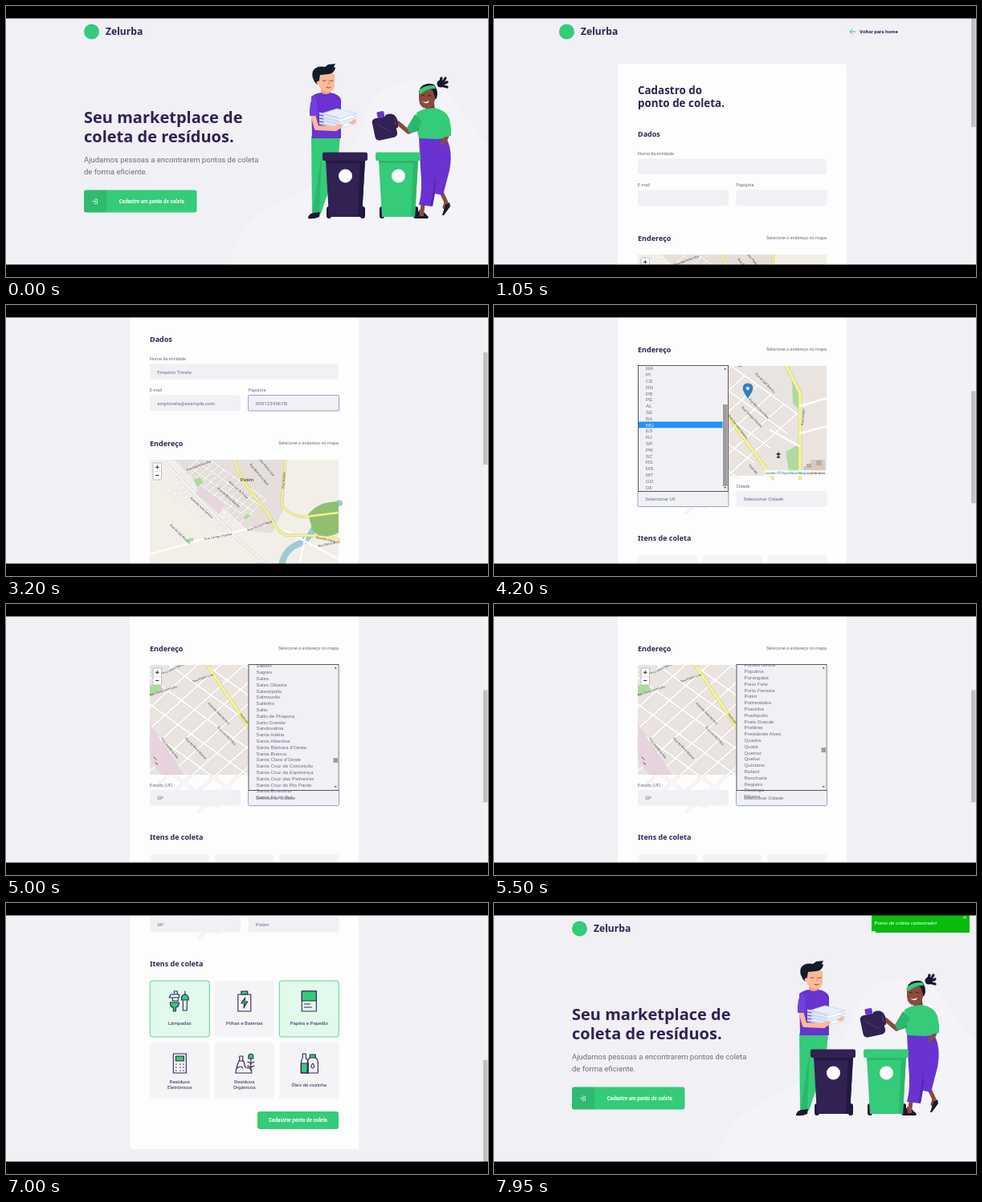
An HTML page for the animation above (8 s loop, 600 by 338 pixels).

```html
<!DOCTYPE html>
<html lang="pt-BR">
<head>
<meta charset="utf-8">
<title>Ponto de coleta</title>
<style>
html, body { margin: 0; width: 100%; height: 100%; overflow: hidden; background: #000; }
svg { display: block; width: 100vw; height: 100vh; }
svg svg { width: auto; height: auto; }
text { font-family: Roboto, sans-serif; font-size: 6.2px; fill: #6c6c80; white-space: pre; }
.h { font-family: "Noto Sans", sans-serif; font-weight: 700; fill: #322153; }
.label { font-size: 5.5px; }
.list { font-family: "Liberation Sans", sans-serif; }
.btn { font-weight: 700; font-size: 6.3px; fill: #fff; text-anchor: middle; }
.mid { text-anchor: middle; }
.item { fill: #322153; text-anchor: middle; }
.street { font-size: 3.9px; fill: #444; font-family: "Noto Sans", sans-serif; }
.ico { fill: none; stroke: #322153; stroke-width: 1.1; stroke-linejoin: round; stroke-linecap: round; }
.ico .g { fill: #34cb79; }
</style>
</head>
<body>
<svg id="stage" viewBox="0 0 600 338"></svg>
<script>
const GREEN = '#34cb79', INK = '#322153', SKIN = '#fbb997', BROWN = '#8a4b3c', VIOLET = '#6833d0';
const BRAND = 'Zelurba';
const NAME = 'Empório Trivela', MAIL = 'emptrivela@example.com', PHONE = '00912345678';

const text = (x, y, s, cls = '', more = '') => `<text x="${x}" y="${y}" class="${cls}" ${more}>${s}</text>`;
const title = (x, y, s, size) => text(x, y, s, 'h', `style="font-size:${size}px"`);
const rect = (x, y, w, h, fill, rx = 0, more = '') =>
  `<rect x="${x}" y="${y}" width="${w}" height="${h}" fill="${fill}" rx="${rx}" ${more}/>`;
const circle = (x, y, r, fill) => `<circle cx="${x}" cy="${y}" r="${r}" fill="${fill}"/>`;
const path = (d, fill, more = '') => `<path d="${d}" fill="${fill}" ${more}/>`;
const line = (d, color, w) => path(d, 'none', `stroke="${color}" stroke-width="${w}" stroke-linecap="round" stroke-linejoin="round"`);
const logo = (x, y) => circle(x + 9.5, y, 9.5, GREEN) + title(x + 27, y + 4.3, BRAND, 12.1);

// ---------- home ----------
function bin(x, color, dark) {
  return rect(x + 5, 250, 6, 15, '#1d1733', 3) + rect(x + 47, 250, 6, 15, '#1d1733', 3) +
    path(`M${x + 4} 192h49l-4 71h-41z`, color) + path(`M${x + 47} 192h6l-4 71h-5z`, dark) +
    path(`M${x + 4} 192h49l-.3 4h-48.4z`, dark) + rect(x, 182.5, 56, 10.5, color, 2) +
    circle(x + 28.5, 212, 8.5, '#fff');
}

function man() {
  const sheets = [0, 1, 2, 3].map(i =>
    path(`M390 ${147 - i * 4}l25 6 22-7-25-6z`, i % 2 ? '#e9effa' : '#f8faff', 'stroke="#b9cbe8" stroke-width=".6"') +
    path(`M390 ${147 - i * 4}l25 6v-2.500l-25-6z`, '#c9d9f2')).join('');
  return path('M380 162h36l-2 24-4 20-18 53h-11z', GREEN) + path('M393 184l-3 73h-8z', '#2bb86b') +
    path('M376 265q0-5 6-7l9-1-1 6q-6 3-14 2z', '#1d1733') +
    path('M392 98h12v12q-6 4-12 0z', '#f2a583') +
    path('M388 85q10-4 21 0v14q-1 9-9 8-9-1-11-9z', SKIN) +
    path('M387 98q-8-9-5-17 5-7 15-5l4-3 9-1-2 4 2 1q-1 7-9 8l-10 1-2 11z', '#101b2c') +
    circle(389, 96, 2.4, SKIN) +
    line('M394 93q2 1.500 4 0M403 93q2 1.500 4 0M399 101.500q3 1.500 5 0', '#5b3030', .8) + line('M401 93l2 4h-2', '#df8d6b', .8) +
    path('M380 113q5-4 12-5 6 4 12 0 11 2 13 9v48h-36z', VIOLET) +
    sheets +
    line('M381.500 133l5 19 24 1', SKIN, 6) + path('M378 137q-1-17 5-25 6 4 4 25z', '#7440dc') +
    path('M407 150l9-3 4 2-6 5h-7zM426 146l8-5 2 3-4 4z', SKIN);
}

function woman() {
  return line('M520 240l-2 16M541 230l7 15-2 6', BROWN, 5) +
    path('M509 265l4-9 7 1 6 6-1 2zM543 261l4-13 5-3 1 5-8 11z', '#1d1733') +
    path('M514 254h6v8h-5z', BROWN) +
    path('M514 163h33q10 16 5 42l-8 31-10-2-3 16-17-2q5-18 2-45z', VIOLET) +
    path('M532 196q4 20-4 52l3 1 4-25z', '#5626b4') +
    circle(541, 97, 4.5, '#15172b') + line('M540 98l2-8M542 98l5-8M542 98l7-3M541 99l8 2', '#15172b', 3.2) +
    path('M515 103q7-9 18-5 6 8 3 17l-5 4-9-9z', '#15172b') +
    path('M521 116h11l2 13-11 4z', '#74392e') +
    path('M514 105q8-6 17 0l3 9q0 12-9 14-10 0-11-11z', BROWN) +
    path('M513 107q6-9 20-8l2 4q-10-1-19 7z', GREEN) +
    line('M517 112q2-2 4 0M525 112q2-2 4 0', '#27110f', .8) + path('M518 119q5 2 9-1-2 6-9 1z', '#fff') +
    path('M511 133q9-6 22-6 15 3 19 14l2 17q-5 8-18 8l-22-1-4-17z', GREEN) +
    line('M511 153l-10 4-13-11', BROWN, 5.5) + path('M509 135l9 9-7 13-9 1-3-6z', '#2bb86b') +
    line('M548 148q5 14-5 23', BROWN, 5) + path('M541 130q14 5 13 32l-11 2z', GREEN) +
    line('M488 146l-5-4', BROWN, 3.5) +
    `<g transform="rotate(-12 471 150)">${rect(457, 138, 28, 28, INK, 5)}${rect(465, 131, 9, 7, VIOLET, 1.5)}` +
    `${line('M476 138q11-2 11 9l-1 7', INK, 3)}${line('M463 146l14 12', '#4b3a75', 1)}</g>`;
}

const home = rect(0, 0, 600, 338, '#f0f0f5') +
  path('M279 323q3-45 45-69 46-22 78-48 38-31 45-66 14-45 60-47 36 0 57 32 14 24 36 46v152z', '#f4f4f8') +
  logo(97, 32) +
  ['Seu marketplace de', 'coleta de resíduos.'].map((s, i) => title(97, 146 + i * 24, s, 20)).join('') +
  ['Ajudamos pessoas a encontrarem pontos de coleta', 'de forma eficiente.'].map((s, i) =>
    text(97, 195 + i * 14.5, s, '', 'style="font-size:9.5px"')).join('') +
  rect(97, 229.5, 140.5, 28, GREEN, 3) + path('M100 229.500h25v28h-25q-3 0-3-3v-22q0-3 3-3z', '#000', 'opacity=".08"') +
  line('M110.500 241h3v5.500h-3M107.500 243.700h4M110 242l1.700 1.700-1.700 1.700', '#fff', .7) +
  text(181.3, 245.8, 'Cadastre um ponto de coleta', 'btn') +
  man() + woman() + bin(394, INK, '#241741') + bin(460, GREEN, '#2bb86b');

// ---------- map ----------
function grid(x, y, w, h, step, angle, width) {
  let d = '';
  for (let i = 0; i <= w; i += step) d += `M${i} 0v${h}`;
  for (let j = 0; j <= h; j += step * 1.35) d += `M0 ${j}h${w}`;
  const at = `transform="translate(${x} ${y}) rotate(${angle}) skewX(-12)"`;
  return `<g ${at}>${line(d, '#d3ccc6', width + .8)}${line(d, '#fff', width)}</g>`;
}
const street = (x, y, a, s) => text(0, 0, s, 'street', `transform="translate(${x} ${y}) rotate(${a})"`);
const road = (d, w) => line(d, '#cfc765', w + 1) + line(d, '#f5f3a0', w);
const green = d => path(d, '#aedb9d');

const farMap = rect(0, 0, 235, 137, '#f2efe9') +
  path('M30 0h140l-4 62-14 30-30-4-70-66z', '#e5dfdb') +
  `<g>${grid(66, -6, 96, 64, 8, 35, 1.1)}</g>` +
  line('M16 0l92 98 60 52', '#c9c2bd', 3) + line('M16 0l92 98 60 52', '#fff', 2) +
  path('M60 30l34 26-8 12-28-26z', '#e6d5dd') +
  green('M54 25l8-3 5 6-8 6zM46 99l8-2v5l-8 1zM116 72l6-5 3 3-6 5z') +
  line('M163 139q2-24 18-32 17-6 25-25 10-22 30-28', '#9ccbd6', 8) +
  path('M197 68q16-18 38-15v38q-20 10-32-2z', '#8fc06f') +
  line('M0 118l70-20 75-17M168 88l67 36M195 90l-10 47', '#fff', 2) +
  road('M105 0q8 24 20 38l21 28q14 26 24 28h25l40 5', 2.6) + road('M169 0l-5 56q12 16 30 15l41-5', 2.2) +
  [[46, 14, -20, 'Rua Jequitibá Alto'], [50, 48, 43, 'Avenida Vale Sereno'], [84, 36, 42, 'Rua da Brisa Mansa'],
   [98, 28, 42, 'Rua Lua de Prata'], [124, 6, 50, 'Rua Bem-te-vi Real'], [136, 0, 50, 'Rua Pedra Lisa'],
   [167, 36, -85, 'Rua Violeta'], [68, 100, -10, 'Rua Campo Florido'], [122, 89, -20, 'Rua Manacá Roxo'],
   [207, 98, 13, 'Rua Rio Claro'], [210, 109, -12, 'Rua Beira Mata'], [25, 82, 44, 'Rua do Ipê Branco']]
    .map(a => street(...a)).join('') +
  text(121, 27, 'Potim', 'mid', 'style="fill:#222"');

const nearMap = rect(0, 0, 235, 137, '#e9e4e0') +
  grid(20, -70, 230, 180, 20, 36, 2.2) +
  path('M0 74l43 63H14L0 118z', '#e6d3dd') +
  green('M0 25l12-3 4 9-16 8zM192 19l10 12v24l-9-8zM184 107l18-10v34h-14z') +
  path('M206 137v-12h9v-8h18v18z', '#d9c9bd') + path('M210 122h6v5h-6zM222 118h7v6h-7z', '#b9aca3') +
  road('M70-2l24 36 28 42 46 64', 3.2) + road('M184-2l18 36v106', 3.4) +
  line('M165 80l36 20M202 50l34-10M202 84l34-9', '#fff', 2.4) +
  [[16, 12, -24, 'Rua Vento Norte'], [0, 39, -18, 'Rua Santa Alvorada'], [54, 22, -20, 'Rua Pedra Lisa'],
   [72, 48, 46, 'Avenida Vale Sereno'], [84, 78, 46, 'Rua Lua de Prata'], [44, 92, 46, 'Rua da Brisa Mansa'],
   [14, 92, 52, 'Rua Jequitibá Alto'], [126, 2, -20, 'Rua Manacá Roxo'], [138, 42, 46, 'Rua Bem-te-vi Real'],
   [129, 52, 46, 'Rua Campo Florido'], [112, 62, 52, 'Avenida Vale Sereno'], [146, 10, 46, 'Rua do Ipê Branco'],
   [206, 74, -85, 'Rua Violeta'], [138, 124, 50, 'Avenida']].map(a => street(...a)).join('') +
  line('M175 108v6M173 110h4M173.500 114h3', '#222', 1.3) +
  line('M5 115l3 3M7 122l3 2', '#555', 1) +
  `<g id="pin">${path('M137 40q-6-9-6-12 0-6 6-6t6 6q0 3-6 12z', '#2a81cb', 'stroke="#1f669f" stroke-width=".7"')}${circle(137, 28, 2.1, '#fff')}</g>`;

const map = `<svg x="179" y="271" style="width:235px;height:137px"><g id="far">${farMap}</g><g id="near">${nearMap}</g>
  ${rect(4, 4, 10.5, 21, '#fff', 1.5, 'stroke="#aaa" stroke-width=".8"')}${line('M4 14.500h10.500', '#ccc', .5)}
  ${line('M7.500 9.300h3.600M9.300 7.500v3.600M7.500 19.500h3.600', '#111', .9)}
  ${rect(157, 130, 78, 7, '#fff', 0, 'opacity=".75"')}
  <text x="158.500" y="135.300" style="font-size:4.3px;fill:#333"><tspan fill="#0078a8">Leaflet</tspan> | © <tspan fill="#0078a8">OpenStreetMap</tspan> contributors</text></svg>`;

// ---------- form ----------
const icons = [
  `<path d="M-7-13h4v4h-4zM-11-9h10v4h-12zM-9-5h7v4h-7z"/><path class="g" d="M-12 1h11q0 6-4 6v5h-3v-5q-4 0-4-6z"/><path d="M4-1v12h5v-12"/><path class="g" d="M2-2q0-7 4.500-7t4.500 7z"/><path d="M6.500-9v-4"/>`,
  `<path d="M-8-9h16v21h-16z"/><path class="g" d="M-4-13h8v4h-8zM1-5l-5 7h4l-1 6 5-8h-4z"/>`,
  `<path d="M-9-13h18v25h-18z"/><path class="g" d="M-9-13h18v12h-18z"/><path d="M-6 3h7M-6 7h9"/>`,
  `<path d="M-8-12h16v24h-16z"/><path class="g" d="M-5-9h10v6h-10z"/><path d="M-5 1h1M0 1h1M4 1h1M-5 5h1M0 5h1M4 5h1M-5 9h1M0 9h1M4 9h1"/>`,
  `<path d="M-11 12h20v-3q-2-4-8-4l-2-8h-6l-3 9z"/><path d="M-6-3v-6h4v6M-9 6q4-4 7 0"/><path class="g" d="M5-10q3-4 6 0v4h-6z"/><path d="M8-6v15M4-2l4 2 4-2M4 3l4 2 4-2"/>`,
  `<path class="g" d="M-10 0h8v12h-8z"/><path d="M-8-12h4v5q3 3 3 7v12h-9v-12q0-4 2-7z"/><path class="g" d="M1-11h7v4h-7z"/><path d="M1-7q-3 2-3 6v13h13v-13q0-4-3-6M4.500 0q4 5 0 6-4-1 0-6"/>`
];
const labels = [['Lâmpadas'], ['Pilhas e Baterias'], ['Papéis e Papelão'], ['Resíduos', 'Eletrônicos'], ['Resíduos', 'Orgânicos'], ['Óleo de cozinha']];
const items = labels.map((names, i) => {
  const x = 179.3 + (i % 3) * 80.5, y = 507 + Math.floor(i / 3) * 77;
  const first = names.length > 1 ? 51 : 55;
  return rect(x, y, 74, 70, '#f4f4f6', 3, `id="item${i}" stroke-width=".8"`) +
    `<g class="ico" transform="translate(${x + 37} ${y + 26})">${icons[i]}</g>` +
    names.map((s, k) => text(x + 37, y + first + k * 7, s, 'item')).join('');
}).join('');

const field = (id, x, y, w) => rect(x, y, w, 19.5, '#f0f0f5', 3, `id="${id}Box" stroke-width="1"`) +
  text(x + 9.3, y + 12, '', '', `id="${id}"`);
const ROWS = 22, PITCH = 7.8;
const list = (id, x) => `<g id="${id}List">${rect(x + .5, 270.5, 112, 157, '#f0f0f5', 0, 'stroke="#333" stroke-width=".8"')}
  <svg x="${x + 1}" y="271" style="width:111px;height:156px">${rect(0, 0, 105, PITCH, '#1e90ff', 0, `id="${id}Hot"`)}
  ${Array.from({ length: ROWS }, () => text(9, 0, '', 'list ' + id + 'Row')).join('')}</svg>
  ${rect(x + 105.5, 271, 6.5, 156, '#f1f1f1')}${path(`M${x + 107} 275.500l1.700-2 1.700 2zM${x + 107} 422l1.700 2 1.700-2z`, '#555')}
  ${rect(x + 106, 0, 5.5, 1, '#9c9c9c', 0, `id="${id}Thumb"`)}</g>`;

const form = rect(0, 0, 600, 338, '#f0f0f5') + `<g id="page">` +
  logo(81, -7) + line('M443 -7h7M446-10l-3 3 3 3', GREEN, 1) + text(455, -5, 'Voltar para home', '', 'style="font-weight:700;fill:#322153"') +
  rect(154, 33, 285, 684, '#fdfdfe', 3) +
  title(179, 70.5, 'Cadastro do', 13.4) + title(179, 87, 'ponto de coleta.', 13.4) +
  [['Dados', 123.5], ['Endereço', 253.5], ['Itens de coleta', 489]].map(([s, y]) => title(179, y, s, 9)).join('') +
  [[179, 147, 'Nome da entidade'], [179, 186, 'E-mail'], [301.5, 186, 'Papojota'], [179, 423, 'Estado (UF)'], [301.5, 423, 'Cidade']]
    .map(([x, y, s]) => text(x, y, s, 'label')).join('') +
  text(414, 252, 'Selecione o endereço no mapa', 'label', 'text-anchor="end"') +
  field('name', 179, 151.5, 235) + field('mail', 179, 190.5, 113) + field('phone', 301.5, 190.5, 113) +
  map + field('uf', 179, 427, 113) + field('city', 301.5, 427, 113) + items +
  rect(313, 670, 101, 22, GREEN, 3) + text(363.5, 683, 'Cadastrar ponto de coleta', 'btn') +
  list('uf', 179) + list('city', 301.5) + '</g>' +
  rect(593, 0, 7, 338, '#f3f3f5') + rect(594, 0, 5.5, 140, '#c1c1c1', 0, 'id="thumb"');

const toast = `<g id="toast">${rect(470, 8, 122, 29, '#07bc0c', .5)}${text(473.5, 26.8, 'Ponto de coleta cadastrado!', '', 'style="font-size:6.25px;fill:#fff"')}
  ${line('M584.500 16.500l3 3M587.500 16.500l-3 3', '#d7f5d8', .8)}${rect(470, 35, 122, 2, '#fff', 0, 'id="progress" opacity=".75"')}</g>`;

document.getElementById('stage').innerHTML = `<g id="home">${home}</g><g id="form">${form}</g>${toast}` +
  rect(0, 0, 600, 15.5, '#000') + rect(0, 322.5, 600, 15.5, '#000');

// ---------- motion ----------
const el = id => document.getElementById(id);
const show = (id, on) => el(id).setAttribute('display', on ? 'inline' : 'none');
const set = (id, attrs) => Object.entries(attrs).forEach(([k, v]) => el(id).setAttribute(k, v));
const clamp = v => Math.min(1, Math.max(0, v));
const typed = (s, t, from, to) => s.slice(0, Math.floor(clamp((t - from) / (to - from)) * s.length));

function track(keys, t) {
  let [t0, v0] = keys[0];
  for (const [t1, v1] of keys) {
    if (t < t1) return v0 + (v1 - v0) * clamp((t - t0) / (t1 - t0));
    [t0, v0] = [t1, v1];
  }
  return v0;
}

const UFS = 'Selecionar UF,RO,AC,AM,RR,PA,AP,TO,MA,PI,CE,RN,PB,PE,AL,SE,BA,MG,ES,RJ,SP,PR,SC,RS,MS,MT,GO,DF'.split(',');
const CITIES = ('Selecionar Cidade,Adamantina,Adolfo,Aguaí,Águas da Prata,Águas de Lindóia,Águas de Santa Bárbara,Águas de São Pedro,Agudos,Alambari,' +
  'Alfredo Marcondes,Altair,Altinópolis,Alto Alegre,Alumínio,Álvares Florence,Álvares Machado,Álvaro de Carvalho,Alvinlândia,Americana,' +
  'Pompéia,Pongaí,Pontal,Pontalinda,Pontes Gestal,Populina,Porangaba,Porto Feliz,Porto Ferreira,Potim,Potirendaba,Pracinha,Pradópolis,Praia Grande,' +
  'Pratânia,Presidente Alves,Quadra,Quatá,Queiroz,Queluz,Quintana,Rafard,Rancharia,Registro,Restinga,Ribeira,Rifaina,Rincão,Rio Claro,Rubiácea,Rubinéia,' +
  "Sabino,Sagres,Sales,Sales Oliveira,Salesópolis,Salmourão,Saltinho,Salto,Salto de Pirapora,Salto Grande,Sandovalina,Santa Adélia,Santa Albertina," +
  "Santa Bárbara d'Oeste,Santa Branca,Santa Clara d'Oeste,Santa Cruz da Conceição,Santa Cruz da Esperança,Santa Cruz das Palmeiras," +
  'Santa Cruz do Rio Pardo,Santa Ernestina,Santa Fé do Sul,Santa Gertrudes').split(',');
const SABINO = CITIES.indexOf('Sabino') + .25, POTIM = CITIES.indexOf('Potim');

const SCROLL = [[1100, -39], [1200, 0], [3050, 0], [3150, 78], [3250, 78], [3400, 195], [5950, 195], [6040, 351], [6750, 351], [6830, 410]];
const UF_SCROLL = [[4020, 0], [4120, 8]];
const CITY_SCROLL = [[4650, 0], [4950, SABINO], [5200, SABINO], [5550, POTIM - 9]];
const CITY_THUMB = [[4650, 279], [4950, 387], [5200, 387], [5550, 372]];

function drawList(id, names, offset, hot, thumbY, thumbH) {
  const first = Math.floor(offset);
  document.querySelectorAll('.' + id + 'Row').forEach((row, i) => {
    const k = first + i;
    row.textContent = names[k] || '';
    row.setAttribute('y', 5.4 + (k - offset) * PITCH);
    row.style.fill = k === hot ? '#fff' : '';
  });
  set(id + 'Hot', { y: (hot - offset) * PITCH - .7 });
  set(id + 'Thumb', { y: thumbY, height: thumbH });
}

function fill(id, value, focused, caret) {
  el(id).textContent = value + (focused && caret ? '|' : '');
  set(id + 'Box', { stroke: focused ? '#8fa6d6' : 'none', rx: focused ? 1 : 3 });
}

function render(t) {
  const onForm = t >= 500 && t < 7150;
  show('form', onForm);
  show('home', !onForm);
  show('toast', t >= 7150);
  const slide = 130 * (1 - clamp((t - 7150) / 150)) ** 3;
  set('toast', { transform: `translate(${slide} 0)` });
  set('progress', { width: 122 * (1 - clamp((t - 7150) / 835)) });
  if (!onForm) return;

  const y = track(SCROLL, t);
  set('page', { transform: `translate(0 ${-y})` });
  set('thumb', { y: 27 + y * .412 });

  fill('name', typed(NAME, t, 1300, 1750), t >= 1250 && t < 1820, true);
  fill('mail', typed(MAIL, t, 1850, 2540), t >= 1820 && t < 2600, true);
  fill('phone', typed(PHONE, t, 2620, 2980), t >= 2600 && t < 3450, true);
  fill('uf', t < 4380 ? 'Selecionar UF' : 'SP', t >= 3950 && t < 4550);
  fill('city', t < 5800 ? 'Selecionar Cidade' : 'Potim', t >= 4550 && t < 6150);

  show('far', t < 3600);
  show('near', t >= 3600);
  show('pin', t >= 3800);
  show('ufList', t >= 3950 && t < 4380);
  show('cityList', t >= 4550 && t < 5800);
  const ufTop = track(UF_SCROLL, t);
  drawList('uf', UFS, ufTop, t < 4020 ? 0 : t < 4250 ? 17 : 20, 279 + ufTop * 5, 102);
  drawList('city', CITIES, track(CITY_SCROLL, t), t < 4650 ? 0 : t > 5600 ? POTIM : -1, track(CITY_THUMB, t), 6);

  labels.forEach((_, i) => {
    const on = (i === 0 && t >= 6250) || (i === 2 && t >= 6450);
    set('item' + i, { fill: on ? '#e1faec' : '#f4f4f6', stroke: on ? GREEN : 'none' });
  });
}

const start = performance.now();
function tick() {
  render((performance.now() - start) % 8000);
  requestAnimationFrame(tick);
}
tick();
</script>
</body>
</html>
```
